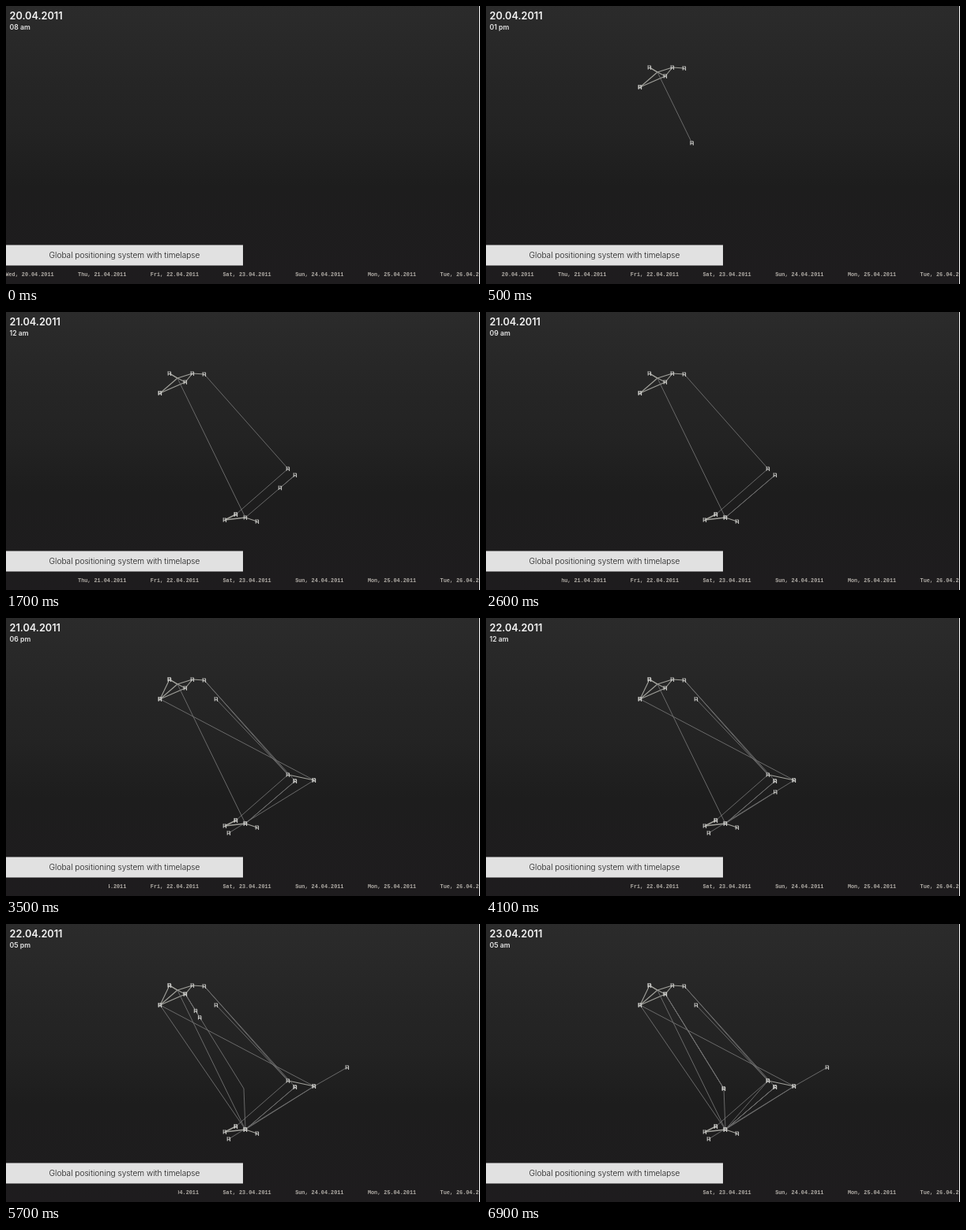
Write an HTML page that moves like this. It is 600 px wide and 353 px high and loops after 7 s.

```html
<!DOCTYPE html>
<html lang="en">
<head>
<meta charset="utf-8">
<title>Timelapse</title>
<style>
html, body { margin: 0; width: 100%; height: 100%; overflow: hidden; background: #1e1e1e; }
svg { display: block; width: 100%; height: 100%; }
text { font-family: Inter, Roboto, sans-serif; }
.day { font: bold 6.8px "Liberation Mono", "DejaVu Sans Mono", monospace; fill: #b0aca6; text-anchor: middle; }
</style>
</head>
<body>
<svg viewBox="0 0 600 353" preserveAspectRatio="none">
  <defs>
    <linearGradient id="sky" x1="0" y1="0" x2="0" y2="1">
      <stop offset="0" stop-color="#2b2b2b"/>
      <stop offset=".3" stop-color="#252525"/>
      <stop offset=".45" stop-color="#232323"/>
      <stop offset=".65" stop-color="#1d1d1d"/>
      <stop offset="1" stop-color="#1e1c1e"/>
    </linearGradient>
    <clipPath id="left"><rect id="ahead" y="330" width="600" height="23"/></clipPath>
  </defs>
  <rect width="600" height="353" fill="url(#sky)"/>
  <g id="trails" fill="none" stroke-linejoin="round"></g>
  <g id="marks" fill="none" stroke="#cdcdca"></g>
  <g id="days" clip-path="url(#left)"></g>
  <rect y="303.5" width="300" height="26" fill="#e1e1e1"/>
  <rect x="599" width="1" height="353" fill="#fff"/>
  <text x="150" y="320" font-size="10.1" font-weight="300" text-anchor="middle" fill="#1c1c1c">Global positioning system with timelapse</text>
  <text id="date" x="4.5" y="16.5" font-size="12.7" font-weight="600" fill="#f4f4f4"></text>
  <text id="hour" x="4.5" y="30" font-size="8.7" font-weight="600" fill="#e4e4e4"></text>
</svg>
<script>
const $ = id => document.getElementById(id);
const STEP = 100, STEPS = 70, SPEED = 25, DAY_WIDTH = 91.7;

function add(parent, tag, attrs) {
  const el = document.createElementNS('http://www.w3.org/2000/svg', tag);
  for (const k in attrs) el.setAttribute(k, attrs[k]);
  return parent.appendChild(el);
}

const places = {
  top: '207,78', home: '217,84', gate: '227,89', roof: '236,78', shop: '251,79',
  park: '195,103', corner: '266,103', bridge: '357,199', mill: '366,207',
  cross: '390,206', hill: '432,182', bend: '301,209', base: '303,261',
  quay: '291,257', west: '277,264', east: '318,266', pier: '282,273'
};

// each trip: the places passed, then the step of departure
const trips = `
  home top 1
  top home gate 1
  home roof shop 1
  gate roof 2
  home park 2
  gate park 3
  home base 1
  base mill 5
  shop bridge 5
  base west 8
  west quay 9
  base east 12
  bridge quay 13
  mill base 16
  shop mill 26
  park cross 26
  bridge cross 27
  bridge corner 28
  cross pier 28
  park top 29
  base cross hill 38
  park base 48
  base bend gate 48
  gate bend 56
  gate bend 55.6
  base bridge 58
  base mill 60`.trim().split('\n').map(line => {
  const stops = line.trim().split(' ');
  const depart = +stops.pop();
  const trail = add($('trails'), 'path', { d: 'M' + stops.map(s => places[s]).join('L') });
  const length = trail.getTotalLength();
  // short hops are walked often, so they show brighter
  const local = length < 38;
  trail.setAttribute('stroke', local ? '#a2a29c' : '#727272');
  trail.setAttribute('stroke-width', stops.includes('west') ? 1.6 : local ? 1.1 : .9);
  const mark = add($('marks'), 'path', { d: 'M-1.8-2.8V2.6M1.6-2V3M-1.8 .8H1.8M-.5-2H1.6' });
  return { depart, trail, length, mark };
});

['Wed', 'Thu', 'Fri', 'Sat', 'Sun', 'Mon', 'Tue'].forEach((name, i) => {
  add($('days'), 'text', { x: 30 + DAY_WIDTH * i, y: 342.5, class: 'day' })
    .textContent = `${name}, ${20 + i}.04.2011`;
});

function draw(n) {
  // the clock rests one step at the first midnight and catches up later
  const elapsed = n - (n >= 16) + (n >= 52);
  const clock = elapsed + 8, h = clock % 24;
  $('date').textContent = 20 + Math.floor(clock / 24) + '.04.2011';
  $('hour').textContent = String(h % 12 || 12).padStart(2, '0') + (h < 12 ? ' am' : ' pm');
  $('ahead').setAttribute('x', elapsed * DAY_WIDTH / 24);

  for (const { depart, trail, length, mark } of trips) {
    const gone = Math.min(length, (n - depart) * SPEED);
    const visibility = gone > 0 ? 'visible' : 'hidden';
    trail.setAttribute('visibility', visibility);
    mark.setAttribute('visibility', visibility);
    if (gone <= 0) continue;
    const { x, y } = trail.getPointAtLength(gone);
    trail.setAttribute('stroke-dasharray', `${gone} 999`);
    mark.setAttribute('transform', `translate(${x} ${y})`);
  }
}

const start = performance.now();
function tick() {
  draw(Math.floor((performance.now() - start) / STEP) % STEPS);
  requestAnimationFrame(tick);
}
tick();
</script>
</body>
</html>
```
